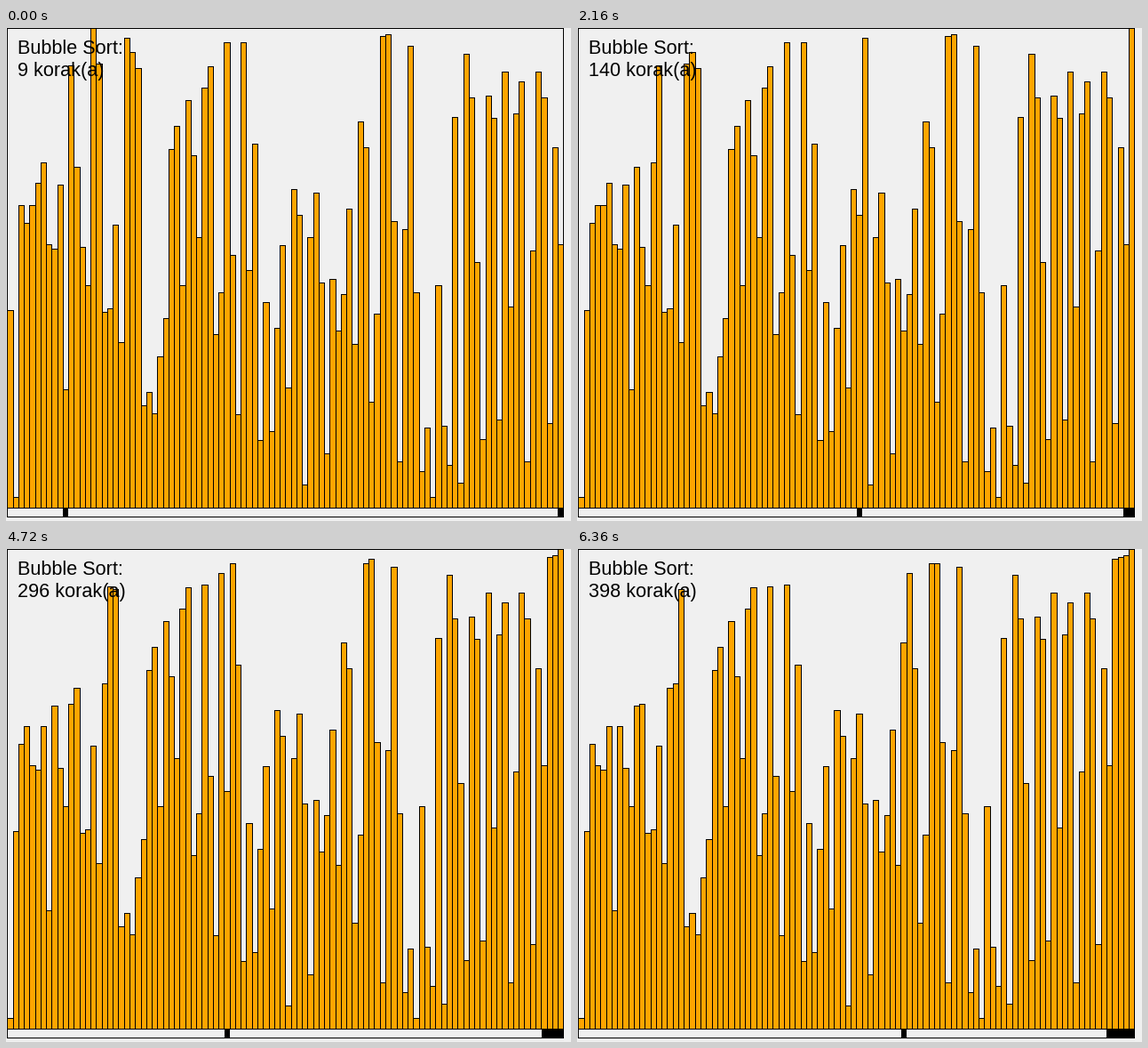
Animation, 636 px wide and 554 px high, one loop 6.41 s. Source, as a matplotlib script:

```python
import numpy as np
import matplotlib.pyplot as plt
from matplotlib.animation import FuncAnimation
from matplotlib.collections import PolyCollection
from matplotlib.patches import Rectangle

W, H = 636, 554
LOOP, TICK = 6410, 10
FLOOR, BOTTOM = 539, 549
N, PITCH = 100, 6.26
FIRST = 9  # swaps already made when the loop starts
PAPER, FILL, INK = "#f0f0f0", "#ffa500", "#000000"

# Top edge of every bar at the start of the loop
TOPS = [
    317, 527, 199, 219, 199, 174, 151, 243, 248, 176,
    406, 42, 156, 246, 289, 0, 40, 319, 315, 221,
    353, 11, 27, 45, 424, 409, 433, 369, 326, 136,
    110, 289, 81, 143, 235, 67, 43, 344, 297, 16,
    255, 434, 16, 272, 130, 463, 308, 453, 337, 244,
    404, 181, 210, 513, 235, 185, 286, 478, 282, 340,
    299, 203, 355, 105, 134, 420, 321, 9, 7, 217,
    487, 226, 20, 297, 498, 449, 527, 289, 447, 491,
    100, 511, 29, 78, 263, 462, 76, 101, 440, 49,
    313, 96, 60, 487, 250, 49, 78, 444, 134, 243,
]

# Screen refreshes: (first ms, last ms, count)
REFRESH = [
    (0, 0, 1), (70, 670, 11), (720, 1340, 12), (1390, 2010, 11),
    (2060, 2680, 13), (2730, 2830, 3), (2930, 3330, 8), (3400, 3650, 6),
    (3700, 4000, 6), (4070, 4670, 10), (4720, 5240, 11), (5290, 5290, 1),
    (5390, 6010, 12), (6060, 6360, 7),
]

# Pace of the sort: swaps made by a given time
PACE = [
    (0, 9), (670, 50), (1340, 92), (1390, 95), (2680, 175), (2830, 188),
    (3650, 235), (4000, 255), (4720, 296), (5240, 328), (5290, 335),
    (6360, 398),
]


def bubble_states(tops, start):
    """Return (tops, cursor, sorted_from) after each swap."""
    a = list(tops)
    states = [(np.array(a), start, N - 1)]
    first = start + 1
    for end in range(N - 1, 0, -1):
        for j in range(first, end):
            if a[j] < a[j + 1]:
                a[j], a[j + 1] = a[j + 1], a[j]
                states.append((np.array(a), j, end))
        first = 0
    return states


def boxes(x0, y0, x1, y1):
    """Stack rectangles as an (n, 4, 2) array of corners."""
    x0, y0, x1, y1 = np.broadcast_arrays(x0, y0, x1, y1)
    return np.stack([
        np.stack([x0, y0], -1), np.stack([x1, y0], -1),
        np.stack([x1, y1], -1), np.stack([x0, y1], -1),
    ], axis=1).astype(float)


def grid(offset):
    return np.floor(offset + PITCH * np.arange(N + 1) + 0.5)


states = bubble_states(TOPS, 10)
times = np.concatenate([np.linspace(*r) for r in REFRESH])
pace_t, pace_n = zip(*PACE)
swaps = np.rint(np.interp(times, pace_t, pace_n)).astype(int)

edges = grid(1.3)
cells = grid(1.55)
left, right = edges[:-1], edges[1:]

fig = plt.figure(figsize=(W / 100, H / 100), dpi=100, facecolor=PAPER)
ax = fig.add_axes([0, 0, 1, 1])
ax.set_xlim(0, W)
ax.set_ylim(H, 0)
ax.axis("off")


def panel(x, y, w, h, color):
    ax.add_patch(Rectangle((x, y), w, h, facecolor=color, linewidth=0,
                           antialiased=False, zorder=1))


panel(1, 0, 627, BOTTOM + 1, INK)
panel(2, 1, 625, BOTTOM - 1, PAPER)

shapes = PolyCollection(
    [], facecolors=[INK] * (N + 2) + [FILL] * N, edgecolors="none",
    linewidths=0, antialiaseds=[False], zorder=2)
ax.add_collection(shapes, autolim=False)


def label(y, text):
    return ax.text(13, y, text, family="Liberation Sans", fontsize=15.55,
                   color=INK, ha="left", va="baseline", zorder=3)


label(29, "Bubble Sort:")
counter = label(54, "")


def update(i):
    k = np.searchsorted(times, i * TICK + 0.5) - 1
    count = swaps[k]
    tops, cursor, done = states[count - FIRST]
    marks = boxes(cells[[cursor, done]], FLOOR + 1,
                  cells[[cursor + 1, N]], BOTTOM)
    outlines = boxes(left, tops, right + 1, FLOOR + 1)
    fills = boxes(left + 1, tops + 1, right, FLOOR)
    shapes.set_verts(np.concatenate([marks, outlines, fills]))
    counter.set_text(f"{count} korak(a)")
    return shapes, counter


anim = FuncAnimation(fig, update, frames=LOOP // TICK, interval=TICK,
                     repeat=True, repeat_delay=0, cache_frame_data=False)
plt.show()
```
